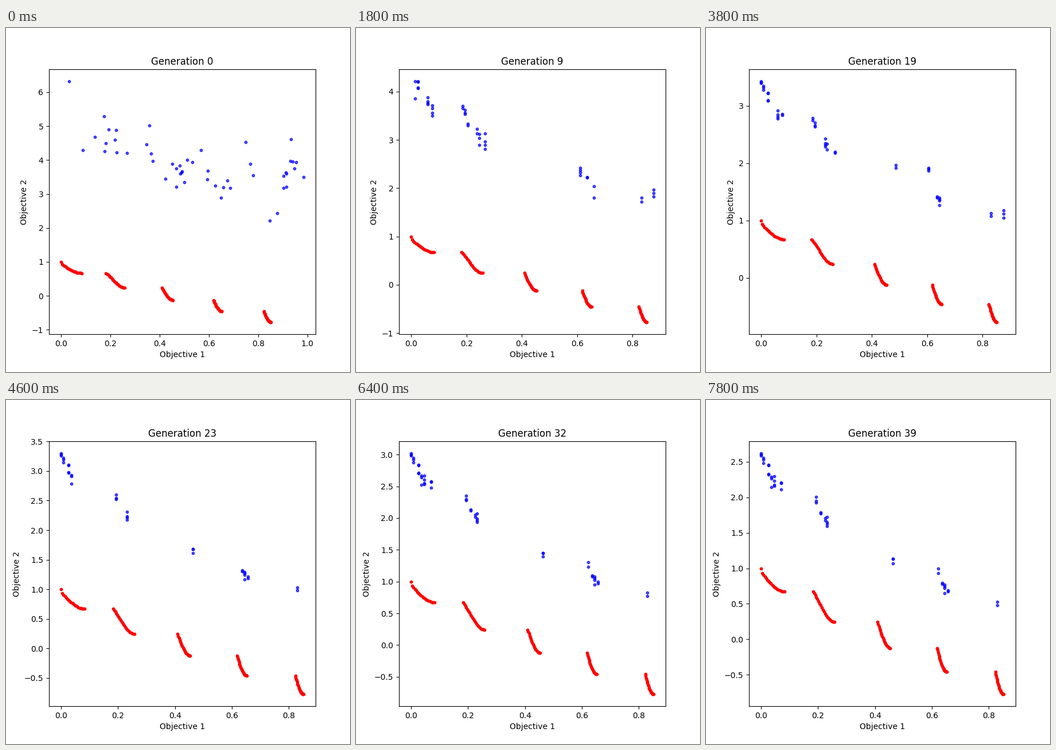
Animation of 600 by 600 pixels, one loop 8 s. Source, as a matplotlib script:

```python
import numpy as np
import matplotlib.pyplot as plt
from matplotlib.animation import FuncAnimation

GENS, STEP_MS, SIZE = 40, 200, 50

# Waves of niches: (earliest, latest birth), (earliest, latest death),
# range of distance around the current level, positions on objective 1
WAVES = [
    ((1, 5), (6, 12), (-.40, .05),
     [.0085, .0148, .077, .157, .205, .247, .267, .438,
      .612, .635, .66, .832, .849, .866, .896]),
    ((8, 13), (39, 39), (-.08, .12),
     [0, .0085, .025, .194, .231, .636, .644, .83]),
    ((8, 13), (19, 22), (-.08, .12),
     [.06, .076, .187, .239, .267, .486, .604, .876]),
    ((20, 28), (39, 39), (-.08, .12),
     [.035, .047, .07, .21, .225, .464, .622, .657]),
]


def value(x, g):
    """Objective 2 at x, for distance term g (1 on the optimal front)."""
    return g - np.sqrt(x * g) - x * np.sin(10 * np.pi * x)


def level(gen):
    """Distance term of the population, falling as it evolves."""
    return np.interp(gen, [0, 5, 13, 19, 23, 32, 39],
                     [5.8, 5.07, 3.83, 3.43, 3.30, 3.02, 2.62])


def pareto_front():
    ends = [(0, .0830015), (.1822288, .2577624), (.4093137, .4538821),
            (.6183968, .6525117), (.8233318, .8518329)]
    x = np.concatenate([np.linspace(a, b, 20) for a, b in ends])
    return x, value(x, 1)


def first_population():
    """Random points, best first, with the two extremes at the end."""
    rng = np.random.default_rng(4)
    x = rng.uniform(.01, .97, SIZE - 2)
    g = np.sort(np.clip(rng.normal(5.5, .35, SIZE - 2), 4.9, 6.2))
    return np.append(x, [.984, .033]), np.append(value(x, g), [3.50, 6.32])


def make_niches():
    rng = np.random.default_rng(11)
    niches = []
    for births, deaths, spread, places in WAVES:
        for i, x in enumerate(places):
            born = rng.integers(*births, endpoint=True)
            last = rng.integers(*deaths, endpoint=True)
            offset = rng.uniform(*spread, rng.integers(2, 5))
            if i == 0:
                # the leftmost niche carries the top of the plot
                offset -= offset.max()
            niches.append((x, born, last, offset))
    return niches


FIRST = first_population()
NICHES = make_niches()
FRONT = pareto_front()


def population(gen):
    keep = max(0, int(SIZE * (1 - gen / 5)))
    xs, ys = [FIRST[0][:keep]], [FIRST[1][:keep]]
    for x, born, last, offset in NICHES:
        if born <= gen <= last:
            xs.append(np.full(len(offset), x))
            ys.append(value(x, level(gen) + offset))
    return np.concatenate(xs), np.concatenate(ys)


fig, ax = plt.subplots(figsize=(6, 6), dpi=100)


def draw(gen):
    ax.clear()
    ax.scatter(*population(gen), s=10, color="blue", alpha=.7)
    ax.scatter(*FRONT, s=10, color="red")
    ax.set_title(f"Generation {gen}")
    ax.set_xlabel("Objective 1")
    ax.set_ylabel("Objective 2")
    return []


anim = FuncAnimation(fig, draw, frames=GENS, init_func=lambda: draw(0),
                     interval=STEP_MS, repeat=True, repeat_delay=0)
plt.show()
```
